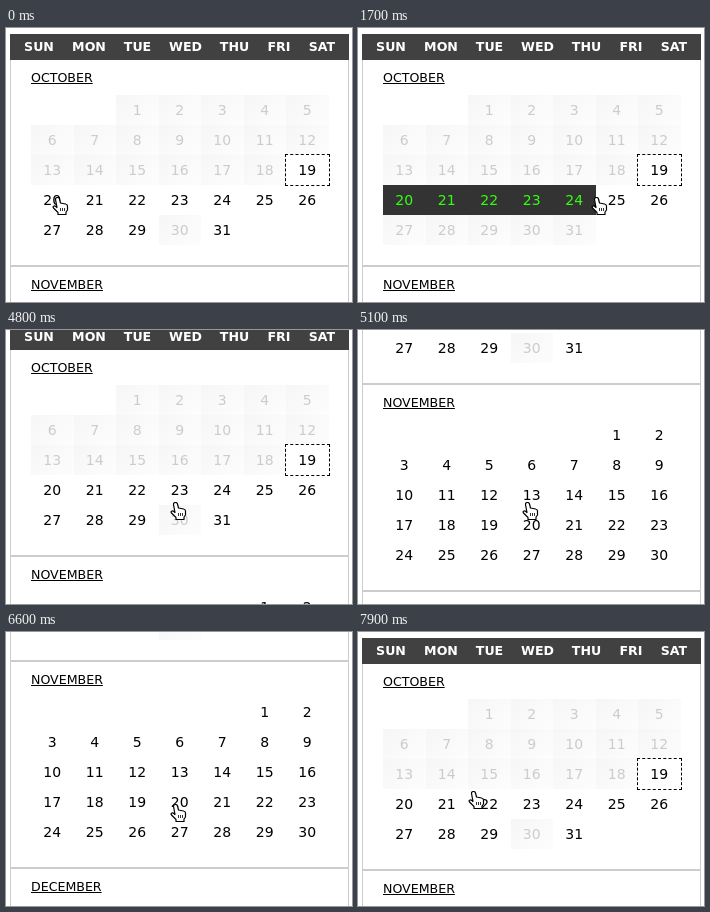
An HTML page for the animation above (8 s loop, 346 by 274 pixels).

```html
<!DOCTYPE html>
<html lang="en">
<head>
<meta charset="utf-8">
<title>Date range picker</title>
<style>
html, body { margin: 0; width: 100%; height: 100%; overflow: hidden; background: #fff; }
body { position: relative; font: 14px/30px "DejaVu Sans", sans-serif; color: #000; }
#page { position: absolute; left: 4px; top: 0; width: 339px; }
#week { position: absolute; top: 6px; width: 100%; height: 26px; background: #414141; color: #fff; font: bold 12.6px/25px "DejaVu Sans", sans-serif; }
#week span { position: absolute; transform: translateX(-50%); }
.month { position: absolute; width: 100%; height: 207px; box-sizing: border-box; border: solid #ccc; border-width: 0 1px 2px; }
.month u { position: absolute; left: 20px; top: 3px; font-size: 12.6px; }
.day { position: absolute; width: 42.5px; height: 30px; text-align: center; }
.off { color: #ccc; background: linear-gradient(135deg, #f6f6f6, #fdfdfd); }
.today { outline: 1px dashed #000; }
.picking { background: #333; color: #3f1; }
.picked { background: #333; color: #ff0; }
#hand { position: absolute; left: 0; top: 0; }
</style>
</head>
<body>
<div id="page"><div id="week"></div></div>
<svg id="hand" width="18" height="19" stroke="#000" stroke-width="1.2" fill="#fff" stroke-linejoin="round">
  <path d="M4.5 2.5q0-2 2-2q1.5 0 2 1.5l1 4l5 1q2 .5 2 2v4l-1.5 2v2.5h-8v-2l-4.5-4.5q-1-1.5 .5-2q1-.3 2 .7l1 .8z"/>
  <path d="M9.5 11v3M11.5 11v3M13.5 11v3" stroke-width=".8"/>
</svg>
<script>
const page = document.getElementById('page');
const week = document.getElementById('week');
const hand = document.getElementById('hand');
const CELL = 42.5, LEFT = 25, TIP = 5, LOOP = 8000, STEP = 100, SCROLL = 220;

function add(parent, tag, text, style, cls = '') {
  const el = document.createElement(tag);
  el.textContent = text;
  el.className = cls;
  Object.assign(el.style, style);
  return parent.appendChild(el);
}

const centers = [29, 79, 127.5, 175.5, 224.5, 269, 312];
['SUN', 'MON', 'TUE', 'WED', 'THU', 'FRI', 'SAT'].forEach((name, i) =>
  add(week, 'span', name, { left: centers[i] + 'px' }));

// name, weekday of the first, number of days
const months = [['OCTOBER', 2, 31], ['NOVEMBER', 5, 30], ['DECEMBER', 0, 31]];
const days = months.map(([name, first, count], m) => {
  const box = add(page, 'div', '', { top: 32 + 207 * m + 'px' }, 'month');
  add(box, 'u', name, {});
  return Array.from({ length: count }, (_, i) => add(box, 'div', i + 1, {
    left: LEFT - 5 + (first + i) % 7 * CELL + 'px',
    top: 35 + Math.floor((first + i) / 7) * 30 + 'px'
  }, 'day'));
});

const progress = (t, start, end) => Math.min(1, Math.max(0, (t - start) / (end - start)));
const swing = u => (1 - Math.cos(Math.PI * u)) / 2;
const glide = u => { const v = u ** 0.7; return v * v * (3 - 2 * v); };

// start, end, x, y
const moves = [[800, 2000, 250, 169], [3000, 3600, 163, 172], [7400, 7900, 109, 159]];

function cursorAt(t) {
  let x = 45, y = 169;
  for (const [start, end, toX, toY] of moves) {
    const p = glide(progress(t, start, end));
    x += (toX - x) * p;
    y += (toY - y) * p;
  }
  return [Math.round(x), Math.round(y)];
}

function dayClass(day, t, last) {
  const picking = t >= 600 && t < 2500;
  if (t >= 600 && t < 4300 && day >= 20 && day <= last) return picking ? 'picking' : 'picked';
  if (day < 19 || day === 30 || picking && day > 26) return 'off';
  return day === 19 ? 'today' : '';
}

function draw(now) {
  const t = Math.floor(now / STEP) * STEP % LOOP;
  const [x, y] = cursorAt(t);
  hand.style.transform = `translate(${x}px, ${y}px)`;
  const last = t < 2500 ? 20 + Math.floor((x + TIP - LEFT) / CELL) : 25;
  days[0].forEach((el, i) => el.className = 'day ' + dayClass(i + 1, t, last));
  const scroll = SCROLL * (swing(progress(t, 4723, 5236)) - swing(progress(t, 6533, 7003)));
  page.style.transform = `translateY(${-Math.round(scroll)}px)`;
  requestAnimationFrame(draw);
}
requestAnimationFrame(draw);
</script>
</body>
</html>
```
